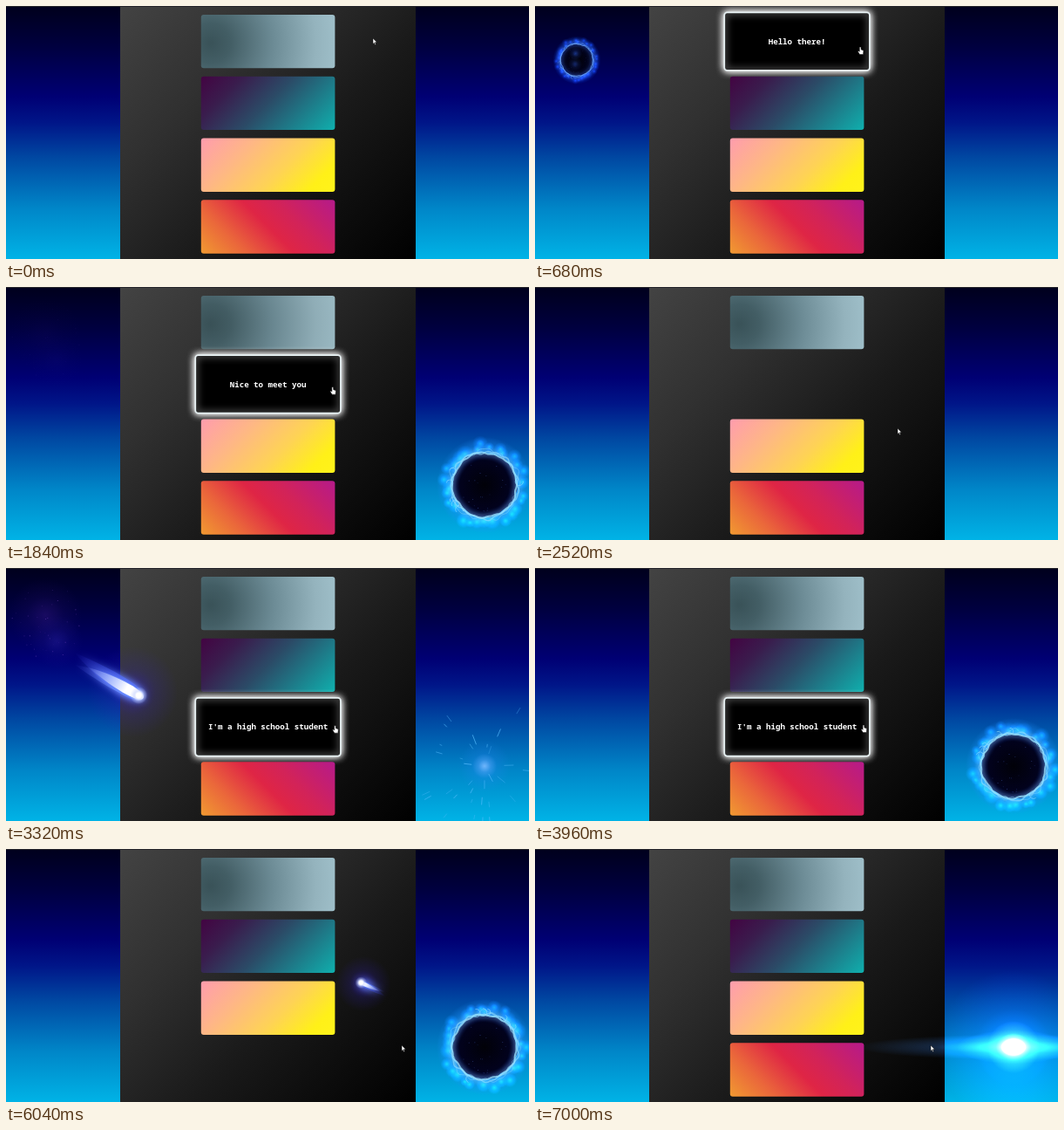
An HTML page with a canvas that plays this animation: 600x290 px, repeating every 7040 ms.

```html
<!DOCTYPE html>
<html lang="en">
<head>
<meta charset="utf-8">
<title>Portal cards</title>
<style>
html, body { margin: 0; width: 100%; height: 100%; overflow: hidden; background: #000; }
canvas { display: block; width: 600px; height: 290px; }
</style>
</head>
<body>
<canvas id="stage" width="600" height="290"></canvas>
<script>
const c = document.getElementById('stage').getContext('2d');
const LOOP = 7040, STEP = 40, TAU = Math.PI * 2;
const LEFT = [48, 62], RIGHT = [549, 227];

const clamp = v => Math.max(0, Math.min(1, v));
const ease = v => { v = clamp(v); return v * v * (3 - 2 * v); };
const ramp = (t, a, b) => clamp((t - a) / (b - a));
const pulse = (t, a, b, fin, fout) => Math.min(ease((t - a) / fin), ease((b - t) / fout));
const rnd = i => { const v = Math.sin(i * 12.9898 + 4.1) * 43758.5453; return v - Math.floor(v); };

function stops(g, list) {
  list.forEach(([p, col]) => g.addColorStop(p, col));
  return g;
}

function slant(sx, sy, list) {
  return stops(c.createLinearGradient(-54 * sx, -54 * sy, 54 * sx, 54 * sy), list);
}

const cards = [
  { text: 'Hello there!', on: 240, off: 1040, back: 1700,
    fill: () => stops(c.createRadialGradient(-66, 2, 2, -66, 2, 142),
      [[0, '#3a5359'], [0.15, '#435e65'], [0.5, '#6c8b95'], [0.85, '#94b3bd'], [1, '#9dbdc7']]) },
  { text: 'Nice to meet you', on: 1500, off: 2320, back: 2960,
    fill: () => slant(1, 1, [[0, '#430442'], [0.22, '#3a1c4d'], [0.5, '#2b4b67'], [1, '#0fb0ae']]) },
  { text: "I'm a high school student", on: 2700, off: 4280, back: 5000,
    fill: () => slant(1, 1, [[0, '#ff9cae'], [0.3, '#feb785'], [0.6, '#fed355'], [0.85, '#fff018'], [1, '#fff31a']]) },
  { text: 'and a self taught coder!', on: 4370, off: 5780, back: 6420,
    fill: () => slant(1, -1, [[0, '#f19a31'], [0.25, '#ea653b'], [0.5, '#df2545'], [0.68, '#d22359'], [1, '#b51a8b']]) }
];

const portals = [
  { at: LEFT, from: 600, to: 1480, aura: '24,82,235', rim: '120,180,255', misty: true },
  { at: RIGHT, from: 1580, to: 2060, aura: '30,145,255', rim: '150,225,255' },
  { at: LEFT, from: 2620, to: 3260, aura: '24,82,235', rim: '120,180,255', misty: true },
  { at: RIGHT, from: 3440, to: 6860, aura: '30,145,255', rim: '150,225,255' }
];
const bursts = [[LEFT, 440, 660], [RIGHT, 1420, 1660], [LEFT, 2520, 2680], [RIGHT, 3200, 3520]];
const flares = [[RIGHT, 2000, 2160, 2080], [RIGHT, 6800, 7160, 6960]];
const mists = [[1440, 1960], [3200, 3760], [6220, 6480]];
const comets = [
  { from: 1440, a: LEFT, b: [193, 229], d: RIGHT, size: 1 },
  { from: 3200, a: LEFT, b: [193, 229], d: RIGHT, size: 1 },
  { from: 5940, a: RIGHT, b: [253, 57], d: LEFT, size: 0.36 }
];
const mouse = [
  [0, 421, 37], [60, 421, 37], [240, 372, 45], [960, 374, 48], [1240, 411, 57],
  [1340, 411, 72], [1500, 374, 112], [2240, 376, 118], [2520, 416, 162],
  [2580, 416, 165], [2720, 378, 181], [4260, 377, 180], [4420, 378, 237],
  [5680, 378, 237], [5960, 454, 225], [LOOP, 454, 225]
];

function glow(x, y, r, rgb, a, core = 0) {
  const g = c.createRadialGradient(x, y, 0, x, y, r);
  stops(g, [[0, `rgba(${rgb},${a})`], [core, `rgba(${rgb},${a})`],
    [(1 + core) / 2, `rgba(${rgb},${a * 0.3})`], [1, `rgba(${rgb},0)`]]);
  c.fillStyle = g;
  c.fillRect(x - r, y - r, 2 * r, 2 * r);
}

function backdrop() {
  c.fillStyle = stops(c.createLinearGradient(0, 0, 0, 290), [
    [0, '#00001c'], [0.16, '#00003f'], [0.36, '#000074'], [0.46, '#001588'],
    [0.6, '#0048a2'], [0.8, '#0086c8'], [1, '#00b3e6']]);
  c.fillRect(0, 0, 600, 290);
  c.fillStyle = stops(c.createLinearGradient(143, -12, 458, 302),
    [[0, '#434343'], [0.3, '#303030'], [0.6, '#191919'], [1, '#000']]);
  c.fillRect(131, 0, 339, 290);
  c.fillStyle = '#25252b';
  c.fillRect(0, 0, 600, 1);
}

function ring(r, wob, seed, t) {
  c.beginPath();
  for (let i = 0; i <= 120; i++) {
    const a = i / 120 * TAU;
    const w = Math.sin(a * 5 + seed + t * 0.006) + Math.sin(a * 11 - seed * 2 - t * 0.009) * 0.7
      + Math.sin(a * 19 + seed * 5 + t * 0.004) * 0.5;
    c.lineTo(Math.cos(a) * (r + w * wob), Math.sin(a) * (r + w * wob));
  }
  c.closePath();
}

function portal(p, t) {
  const k = pulse(t, p.from, p.to, 160, 120);
  if (k <= 0) return;
  c.save();
  c.translate(...p.at);
  c.scale(k, k);
  const halo = c.createRadialGradient(0, 0, 32, 0, 0, 55);
  c.fillStyle = stops(halo, [[0, `rgba(${p.aura},.9)`], [0.35, `rgba(${p.aura},.6)`], [1, `rgba(${p.aura},0)`]]);
  c.fillRect(-56, -56, 112, 112);
  c.globalCompositeOperation = 'lighter';
  for (let i = 0; i < 28; i++) {
    const a = (i + rnd(i)) / 28 * TAU + t * 0.0004, r = 40 + 8 * rnd(i + 40);
    glow(Math.cos(a) * r, Math.sin(a) * r, 5 + 5 * rnd(i + 80), p.aura, 0.5);
  }
  c.globalCompositeOperation = 'source-over';
  const hole = c.createRadialGradient(0, 0, 0, 0, 0, 38);
  c.fillStyle = stops(hole, [[0, '#010108'], [0.75, '#02021d'], [1, '#06125c']]);
  ring(37, 0.7, 1, t);
  c.fill();
  if (p.misty) {
    glow(-3, -15, 15, '35,75,190', 0.65);
    glow(-4, 9, 16, '35,70,180', 0.55);
  }
  for (let i = 0; i < 22; i++) {
    const a = rnd(i + 7) * TAU, r = 30 * Math.sqrt(rnd(i + 31));
    c.fillStyle = `rgba(80,110,210,${0.25 + 0.4 * rnd(i + 60)})`;
    c.fillRect(Math.cos(a) * r, Math.sin(a) * r, 0.8, 0.8);
  }
  c.shadowColor = `rgb(${p.rim})`;
  c.shadowBlur = 6;
  for (let i = 0; i < 3; i++) {
    ring(37 + i * 1.2, 0.7 + i * 0.6, i * 2.1, t);
    c.strokeStyle = `rgba(${p.rim},${0.8 - i * 0.22})`;
    c.lineWidth = 2 - i * 0.5;
    c.stroke();
  }
  c.shadowBlur = 0;
  c.lineWidth = 0.8;
  c.strokeStyle = `rgba(${p.rim},.7)`;
  for (let i = 0; i < 6; i++) {
    const a = rnd(i + 13) * TAU + t * 0.0005;
    c.beginPath();
    c.arc(Math.cos(a) * 40, Math.sin(a) * 40, 3 + 2 * rnd(i), a, a + 4.4);
    c.stroke();
  }
  c.restore();
}

function burst([at, from, to], t) {
  const k = ramp(t, from, to);
  if (k <= 0 || k >= 1) return;
  const a = Math.min(1, (1 - k) * 2);
  c.save();
  c.translate(...at);
  glow(0, 0, 30, '50,135,255', 0.55 * a);
  glow(0, 0, 14, '125,190,255', 0.85 * a);
  c.lineWidth = 0.9;
  for (let i = 0; i < 34; i++) {
    const ang = rnd(i + 3) * TAU, r = (15 + 100 * rnd(i + 50)) * (0.25 + k), len = 3 + 9 * rnd(i + 90);
    c.strokeStyle = `rgba(90,190,255,${(0.3 + 0.5 * rnd(i + 20)) * a})`;
    c.beginPath();
    c.moveTo(Math.cos(ang) * r, Math.sin(ang) * r);
    c.lineTo(Math.cos(ang) * (r + len), Math.sin(ang) * (r + len));
    c.stroke();
  }
  c.restore();
}

function flare([at, from, to, peak], t) {
  const k = t < peak ? ease(ramp(t, from, peak)) : 1 - ease(ramp(t, peak, to));
  if (k <= 0) return;
  c.save();
  c.globalCompositeOperation = 'lighter';
  glow(at[0], at[1], 88, '20,75,200', 0.65 * k);
  c.translate(...at);
  c.save();
  c.scale(1, 0.08);
  glow(0, 0, 180, '60,140,255', 0.85 * k);
  c.restore();
  c.save();
  c.scale(1, 0.3);
  glow(0, 0, 65, '120,210,255', 0.8 * k);
  c.restore();
  glow(0, 0, 30, '160,220,255', 0.85 * k, 0.1);
  c.scale(1.35, 1);
  glow(0, 0, 15, '255,255,255', k, 0.45);
  c.restore();
}

function mist([from, to], t) {
  const k = pulse(t, from, to, 60, to - from - 60);
  if (k <= 0) return;
  const [x, y] = LEFT;
  glow(x - 3, y - 8, 42, '62,28,140', 0.4 * k);
  glow(x + 10, y + 22, 30, '40,32,160', 0.45 * k);
  for (let i = 0; i < 40; i++) {
    const a = rnd(i + 4) * TAU, r = 42 * Math.sqrt(rnd(i + 70));
    c.fillStyle = `rgba(120,70,190,${0.65 * k * rnd(i + 9)})`;
    c.fillRect(x + Math.cos(a) * r, y + Math.sin(a) * r, 1, 1);
  }
}

function comet(m, t) {
  const u = (t - m.from) / 400;
  if (u <= 0 || u >= 1) return;
  const v = 1 - u;
  const pos = i => v * v * m.a[i] + 2 * u * v * m.b[i] + u * u * m.d[i];
  const vel = i => v * (m.b[i] - m.a[i]) + u * (m.d[i] - m.b[i]);
  const s = m.size, a = Math.min(1, u * 8, v * 8);
  c.save();
  c.translate(pos(0), pos(1));
  c.rotate(Math.atan2(vel(1), vel(0)));
  c.globalAlpha = a;
  glow(-10 * s, 0, 20 + 32 * s, '52,35,185', 0.65);
  const tail = (len, w, from, to, dy) => {
    c.fillStyle = stops(c.createLinearGradient(-len * s, 0, 3, 0), [[0, to], [0.7, from], [1, from]]);
    c.beginPath();
    c.moveTo(4 * s, 0);
    c.bezierCurveTo(4 * s, -w * s, -len * 0.45 * s, -w * s, -len * s, dy * s);
    c.bezierCurveTo(-len * 0.45 * s, w * s, 4 * s, w * s, 4 * s, 0);
    c.fill();
  };
  c.shadowColor = '#6585ff';
  c.shadowBlur = 8;
  tail(90, 12, 'rgba(75,100,245,.75)', 'rgba(45,50,210,0)', -7);
  tail(84, 10, 'rgba(110,150,255,.7)', 'rgba(80,90,240,0)', 5);
  tail(68, 8, '#fff', 'rgba(175,195,255,0)', 0);
  glow(-2 * s, 0, 5 + 5 * s, '255,255,255', 1, 0.3);
  c.restore();
}

function card(d, i, t) {
  if (t >= d.off + 60 && t < d.back) return;
  const h = pulse(t, d.on, d.off + 60, 140, 60);
  c.save();
  c.translate(300.6, 40.6 + 70.8 * i);
  c.scale(1 + 0.085 * h, 1 + 0.085 * h);
  if (t >= d.back) c.globalAlpha = ease((t - d.back) / 160);
  if (h > 0) {
    c.shadowColor = `rgba(255,255,255,${h})`;
    c.shadowBlur = 9 * h;
  }
  c.beginPath();
  c.roundRect(-76.8, -30.7, 153.6, 61.4, 3);
  c.fillStyle = d.fill();
  c.fill();
  if (h > 0) {
    c.globalAlpha = h;
    c.fillStyle = '#000';
    c.fill();
    c.strokeStyle = '#e8f2f4';
    c.lineWidth = 1.6;
    c.stroke();
    c.shadowBlur = 0;
    c.fillStyle = '#fff';
    c.font = 'bold 8.45px "Noto Sans Mono", "DejaVu Sans Mono", monospace';
    c.textAlign = 'center';
    c.fillText(d.text, 0, 3);
  }
  c.restore();
}

function poly(points) {
  c.beginPath();
  points.forEach(p => c.lineTo(...p));
  c.closePath();
  c.fill();
  c.stroke();
}

function cursor(t) {
  let i = 1;
  while (mouse[i][0] < t) i++;
  const [t0, x0, y0] = mouse[i - 1], [t1, x1, y1] = mouse[i];
  const k = ease((t - t0) / (t1 - t0));
  c.save();
  c.translate(x0 + (x1 - x0) * k, y0 + (y1 - y0) * k);
  c.fillStyle = '#fff';
  c.strokeStyle = '#111';
  c.lineWidth = 0.5;
  if (cards.some(d => t >= d.on && t < d.off)) {
    poly([[-1, 0], [0.6, 0], [0.8, 3], [3.6, 4], [3.2, 8.5], [-0.8, 8.5], [-3, 5], [-2, 4.4], [-1, 5.4]]);
  } else {
    poly([[0, 0], [0, 6.4], [1.4, 5.2], [2.4, 7.4], [3.4, 7], [2.4, 4.8], [4.4, 4.6]]);
  }
  c.restore();
}

function draw(t) {
  backdrop();
  mists.forEach(m => mist(m, t));
  bursts.forEach(b => burst(b, t));
  portals.forEach(p => portal(p, t));
  flares.forEach(f => flare(f, t));
  comets.forEach(m => comet(m, t));
  cards.forEach((d, i) => card(d, i, t));
  cursor(t);
}

const start = performance.now();
function tick() {
  const t = (performance.now() - start) % LOOP;
  draw(Math.floor(t / STEP) * STEP);
  requestAnimationFrame(tick);
}
tick();
</script>
</body>
</html>
```
